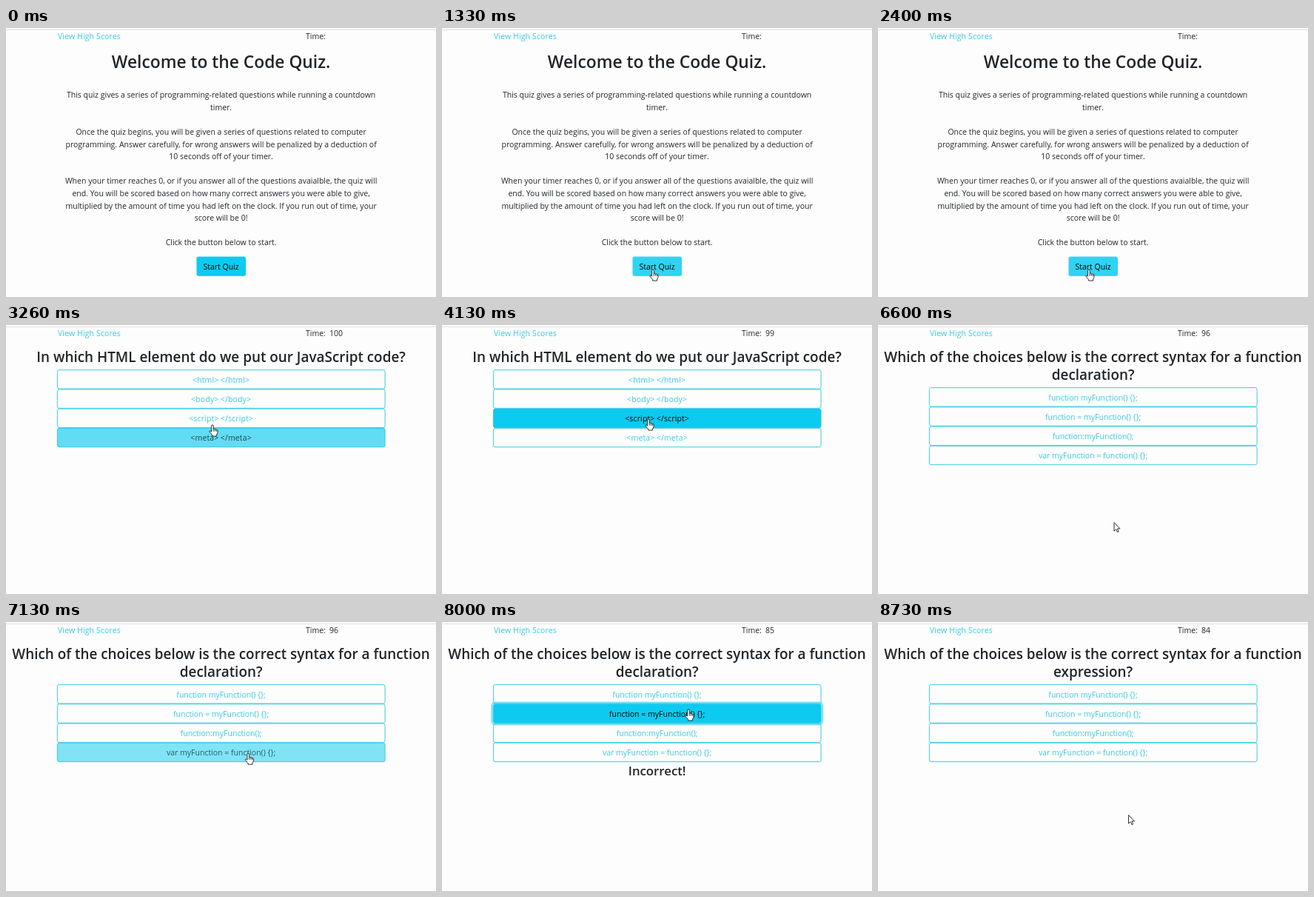
An HTML page with a canvas for the animation above (8.8 s loop, 581x363 px).

```html
<!DOCTYPE html>
<html lang="en">
<head>
<meta charset="utf-8">
<title>Code Quiz</title>
<style>
  html, body { margin: 0; width: 100%; height: 100%; overflow: hidden; background: #fdfdfd; }
  canvas { display: block; }
</style>
</head>
<body>
<canvas id="stage" width="581" height="363"></canvas>
<script>
const ctx = document.getElementById('stage').getContext('2d');
const LOOP = 8800, FADE = 150, CENTER = 290.6;
const INK = '#212529', LINK = [60, 200, 224], OUTLINE = '#2cc6e2';
const QUIZ_START = 2430, PENALTY_AT = 7600;
const LIST_X = 69, LIST_W = 443.5, ROW = 26.2;

const INTRO = [
  [94, 'This quiz gives a series of programming-related questions while running a countdown', 'timer.'],
  [144, 'Once the quiz begins, you will be given a series of questions related to computer',
    'programming. Answer carefully, for wrong answers will be penalized by a deduction of',
    '10 seconds off of your timer.'],
  [210.4, 'When your timer reaches 0, or if you answer all of the questions avaialble, the quiz will',
    'end. You will be scored based on how many correct answers you were able to give,',
    'multiplied by the amount of time you had left on the clock. If you run out of time, your',
    'score will be 0!'],
  [293.4, 'Click the button below to start.']
];
const SYNTAX = ['function myFunction() {};', 'function = myFunction() {};',
  'function:myFunction();', 'var myFunction = function() {};'];
const SYNTAX_TITLE = 'Which of the choices below is the correct syntax for a function';

// hovers: [enter, leave, row]
const QUESTIONS = [
  { from: QUIZ_START, to: 5300,
    title: ['In which HTML element do we put our JavaScript code?'],
    answers: ['html', 'body', 'script', 'meta'].map(tag => `<${tag}>\u2009</${tag}>`),
    hovers: [[3205, 3262, 3], [3262, 4496, 2], [4496, 4575, 3]],
    click: 4300, picked: 2, verdict: 'Correct!' },
  { from: 5300, to: 8600,
    title: [SYNTAX_TITLE, 'declaration?'], answers: SYNTAX,
    hovers: [[7089, 7186, 3], [7186, 7282, 2], [7282, 8371, 1], [8371, 8430, 2], [8430, 8490, 3]],
    click: PENALTY_AT, picked: 1, verdict: 'Incorrect!' },
  { from: 8600, to: LOOP,
    title: [SYNTAX_TITLE, 'expression?'], answers: SYNTAX, hovers: [], click: Infinity }
];
const START_HOVER = [805, QUIZ_START];

// [time, x, y] of the pointer tip
const PATH = [[500, 300, 364], [900, 285, 326], [2900, 285, 326], [3260, 279, 135], [3400, 279, 127],
  [4460, 279, 127], [4900, 318, 273], [5200, 318, 273], [5500, 319, 266.5], [6800, 319, 266.5],
  [7350, 333, 118], [8330, 333, 118], [8650, 338.5, 260.5], [LOOP, 338.5, 260.5]];

const ARROW = new Path2D('M0 0V11.5L2.7 9L4.5 13L6.2 12.3L4.5 8.3H8Z');
const HAND = new Path2D('M-1.4 9V1Q-1.4 0 0 0T1.2 1V5.3Q2.6 4.6 3.4 5.8Q4.8 5.2 5.4 6.4Q7 6 7 7.6V10.5' +
  'L5.6 13V15H-.4V13.5L-4 9.2Q-4.4 7.6 -2.8 8Z');
const KNUCKLES = new Path2D('M1.2 5.3v3.3M3.4 5.8v2.8M5.4 6.4v2.4');

const clamp = v => Math.min(1, Math.max(0, v));
const fade = (t, start) => 1 - (1 - clamp((t - start) / FADE)) ** 2.2;
const pulse = (t, [enter, leave]) => fade(t, enter) * (1 - fade(t, leave));
const within = (t, [enter, leave]) => t >= enter && t < leave;
const cyan = alpha => `rgba(13,202,240,${alpha})`;
const mix = (a, b, p) => `rgb(${a.map((v, i) => Math.round(v + (b[i] - v) * p))})`;

function text(str, x, y, { size = 10.5, weight = 400, color = INK, align = 'center', spacing = 0 } = {}) {
  ctx.font = `${weight} ${size}px "Open Sans", "Noto Sans", sans-serif`;
  ctx.letterSpacing = spacing + 'px';
  ctx.textAlign = align;
  ctx.fillStyle = color;
  ctx.fillText(str, x, y);
}

function box(x, y, w, h, radius) {
  ctx.beginPath();
  ctx.roundRect(x, y, w, h, radius);
}

function drawHeader(t) {
  ctx.fillStyle = '#dcdfe2';
  ctx.fillRect(0, 2, 581, 1);
  text('View High Scores', 70, 15.3, { color: `rgb(${LINK})`, align: 'left', spacing: 0.12 });
  text('Time:', 405, 15.3, { align: 'left' });
  if (t < QUIZ_START) return;
  const left = 100 - Math.floor((t - QUIZ_START) / 1000) - (t >= PENALTY_AT ? 10 : 0);
  text(String(left), 437, 15.3, { align: 'left' });
}

function drawIntro(t) {
  text('Welcome to the Code Quiz.', CENTER, 54.3, { size: 22.8, weight: 600 });
  for (const [top, ...lines] of INTRO)
    lines.forEach((line, i) => text(line, CENTER, top + i * 16.6));
  box(257.5, 308.5, 66.5, 26.3, 2.8);
  ctx.fillStyle = mix([13, 202, 240], [49, 210, 242], pulse(t, START_HOVER));
  ctx.fill();
  text('Start Quiz', CENTER, 325.8, { color: '#000' });
}

function drawAnswer(label, y, level, ring) {
  if (ring > 0) {
    const spread = 2.8 * ring;
    box(LIST_X - spread / 2, y - spread / 2, LIST_W + spread, ROW + spread, 4);
    ctx.lineWidth = spread;
    ctx.strokeStyle = cyan(0.5 * ring);
    ctx.stroke();
  }
  box(LIST_X + 0.4, y + 0.4, LIST_W - 0.8, ROW - 0.8, 2.5);
  ctx.fillStyle = cyan(level);
  ctx.fill();
  ctx.lineWidth = 0.9;
  ctx.strokeStyle = OUTLINE;
  ctx.stroke();
  text(label, CENTER, y + ROW / 2 + 4.2, {
    color: mix(LINK, [0, 0, 0], level),
    spacing: label[0] === '<' ? 0.15 : 0
  });
}

function drawQuestion(q, t) {
  q.title.forEach((line, i) => text(line, CENTER, 50.2 + i * 24, { size: 18.9, weight: 600 }));
  const top = 36.4 + q.title.length * 23.9;
  q.answers.forEach((label, row) => {
    const levels = q.hovers.filter(h => h[2] === row).map(h => pulse(t, h));
    drawAnswer(label, top + row * ROW, Math.max(0, ...levels), row === q.picked ? fade(t, q.click) : 0);
  });
  if (t >= q.click) text(q.verdict, CENTER, top + 123, { size: 16.8, weight: 600 });
}

function drawPointer(t, isHand) {
  const next = PATH.findIndex(p => p[0] > t);
  if (next < 1) return;
  const [t0, x0, y0] = PATH[next - 1], [t1, x1, y1] = PATH[next];
  const p = (t - t0) / (t1 - t0);
  ctx.save();
  ctx.translate(x0 + (x1 - x0) * p, y0 + (y1 - y0) * p);
  ctx.fillStyle = '#fff';
  ctx.strokeStyle = '#111';
  ctx.lineWidth = 0.85;
  ctx.lineJoin = 'round';
  ctx.fill(isHand ? HAND : ARROW);
  ctx.stroke(isHand ? HAND : ARROW);
  if (isHand) ctx.stroke(KNUCKLES);
  ctx.restore();
}

function draw(now) {
  const t = now % LOOP;
  ctx.fillStyle = '#fdfdfd';
  ctx.fillRect(0, 0, 581, 363);
  drawHeader(t);
  const question = QUESTIONS.find(q => within(t, [q.from, q.to]));
  if (question) drawQuestion(question, t);
  else drawIntro(t);
  const hovers = question ? question.hovers : [START_HOVER];
  drawPointer(t, hovers.some(h => within(t, h)));
}

const began = performance.now();
function tick() {
  draw(performance.now() - began);
  requestAnimationFrame(tick);
}
tick();
</script>
</body>
</html>
```
